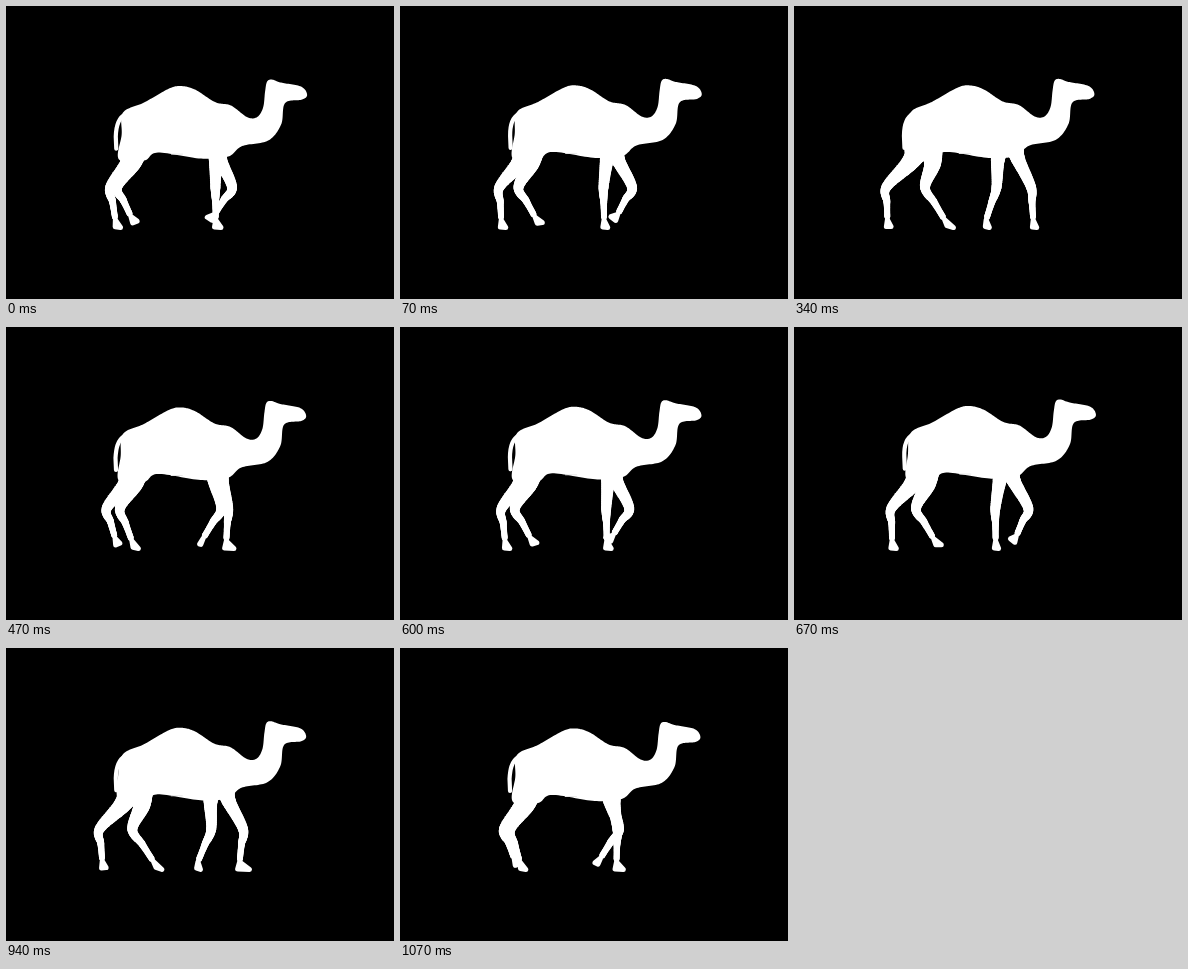
An HTML page with a canvas that plays this animation: 388x293 px, repeating every 1.14 s.

```html
<!DOCTYPE html>
<html lang="en">
<head>
<meta charset="utf-8">
<title>Walking camel</title>
<style>
html, body { margin: 0; width: 100%; height: 100%; overflow: hidden; background: #000; }
canvas { display: block; }
</style>
</head>
<body>
<canvas id="stage" width="388" height="293"></canvas>
<script>
const ctx = document.getElementById('stage').getContext('2d');
const LOOP = 1140, STEPS = 17;

const mix = (a, b, p) => a + (b - a) * p;
const clamp = v => Math.max(0, Math.min(1, v));
const smooth = v => v * v * (3 - 2 * v);

// Samples of a Catmull-Rom curve through points of any dimension
function spline(points, closed) {
  const n = points.length, out = [];
  const at = i => points[closed ? (i + n) % n : Math.max(0, Math.min(n - 1, i))];
  for (let i = 0; i < (closed ? n : n - 1); i++) {
    const [a, b, c, d] = [at(i - 1), at(i), at(i + 1), at(i + 2)];
    for (let u = 0; u <= 1; u += 1 / 16) {
      out.push(b.map((v, j) => v + u / 2 * (c[j] - a[j]
        + u * (2 * a[j] - 5 * v + 4 * c[j] - d[j]
        + u * (3 * (v - c[j]) + d[j] - a[j])))));
    }
  }
  return out;
}

// A joint eases forward from lift to land, waits, then is drawn back from plant on
function sweep(phase, { back, front, lift, land, plant }) {
  const t = (phase - lift + STEPS) % STEPS + lift;
  const rest = 1 - clamp((t - plant) / (lift + STEPS - plant));
  return mix(back, front, t < land ? smooth((t - lift) / (land - lift)) : rest * rest);
}

// Height of the foot during its swing, 0 to 1
function rise(phase, { lift, land }) {
  const t = (phase - lift + STEPS) % STEPS;
  return Math.sin(Math.PI * clamp(t / (land - lift))) ** 2;
}

const hind = {
  knee: { back: 92, front: 134, lift: 4.5, land: 13, plant: 13.2 },
  ankle: { back: 91, front: 149, lift: 4, land: 12.3, plant: 13.8 },
  toe: { back: 97, front: 162, lift: 4, land: 12.3, plant: 13.8 },
  lift: 6.5,
  upper: knee => [[129 + (knee - 100) * .2, 138, 13], [120 + (knee - 100) * .6, 157, 8.5]]
};
const fore = {
  knee: { back: 198, front: 237, lift: 3.3, land: 11.3, plant: 14.2 },
  ankle: { back: 193, front: 239, lift: 5.3, land: 13, plant: 13.5 },
  toe: { back: 191, front: 246, lift: 6.8, land: 14, plant: 14 },
  lift: 11,
  upper(knee, ankle) {
    const lean = (knee + ankle) / 2 - 212;
    return [[212 + lean * .3, 138, 10], [211 + lean * .5, 153, 7]];
  }
};

function leg(limb, phase) {
  const [kx, ax, tx] = [limb.knee, limb.ankle, limb.toe].map(j => sweep(phase, j));
  const lift = limb.lift * rise(phase, limb.ankle);
  const ky = 181, ay = 211 - lift / 2, ty = 221.5 - lift;
  const joints = [...limb.upper(kx, ax), [kx, ky, 5], [mix(kx, ax, .5), mix(ky, ay, .5), 3.4], [ax, ay, 2.9]];
  for (const [x, y, r] of spline(joints)) {
    ctx.beginPath();
    ctx.arc(x, y, r, 0, 7);
    ctx.fill();
  }
  // Hoof: ankle, heel in line with the shank, toe
  const d = Math.hypot(ax - kx, ay - ky), dx = (ax - kx) / d, dy = (ay - ky) / d;
  const inset = Math.sign(tx - ax) * 2.5;
  ctx.lineWidth = 5;
  ctx.beginPath();
  ctx.moveTo(ax + dx * 3, ay + dy * 3);
  ctx.lineTo(ax + dx * 10 - inset / 2, ay + dy * 10);
  ctx.lineTo(tx - inset, ty);
  ctx.closePath();
  ctx.fill();
  ctx.stroke();
}

// Edge points from the rump over hump and head to the belly
function body(rump) {
  const edge = [
    [117, 106], [138, 96], [163, 82], [176, 79.5], [190, 83.5], [209, 95.5], [225, 99],
    [241, 110.5], [251, 110.5], [257, 101], [259, 85], [261, 75], [266, 73], [275, 76],
    [295, 80], [301, 88], [296, 93], [279, 96.5], [275, 118], [262, 134], [236, 139.5],
    [222, 150], [195, 152], [152, 146], [138, 154], [113, 153], [rump, 128]
  ];
  ctx.beginPath();
  spline(edge, true).forEach(p => ctx.lineTo(...p));
  ctx.fill();
}

function tail(sway) {
  ctx.lineWidth = 4.2;
  ctx.beginPath();
  ctx.moveTo(119, 108);
  ctx.bezierCurveTo(111, 112, 110, 122, 110 + sway, 130);
  ctx.lineTo(110.5 + sway, 142);
  ctx.stroke();
}

function draw(step) {
  const wave = shift => Math.cos(4 * Math.PI * (step - shift) / STEPS);
  ctx.setTransform(1, 0, 0, 1, 0, 0);
  ctx.fillStyle = '#000';
  ctx.fillRect(0, 0, 388, 293);
  ctx.fillStyle = ctx.strokeStyle = '#fff';
  ctx.lineCap = ctx.lineJoin = 'round';
  for (const phase of [step, step + STEPS / 2]) {
    leg(hind, phase);
    leg(fore, phase);
  }

  // The body bobs twice per loop while the head nods forward
  const nod = wave(2) / 190;
  ctx.setTransform(1 + nod, 0, 0, 1, -110 * nod, -wave(3));
  body(113.2 - 2.5 * wave(4));
  tail(-.5 * wave(7));
  ctx.fillStyle = '#e8e8e8';
  ctx.fillRect(165, 147, 12, 1);
}

let shown = -1;
function tick(now) {
  // Each pose starts on a whole hundredth of a second
  const t = now % LOOP;
  const start = i => Math.round(i * LOOP / STEPS / 10) * 10;
  let step = STEPS - 1;
  while (start(step) > t) step--;
  if (step !== shown) draw(shown = step);
  requestAnimationFrame(tick);
}
draw(0);
requestAnimationFrame(tick);
</script>
</body>
</html>
```
